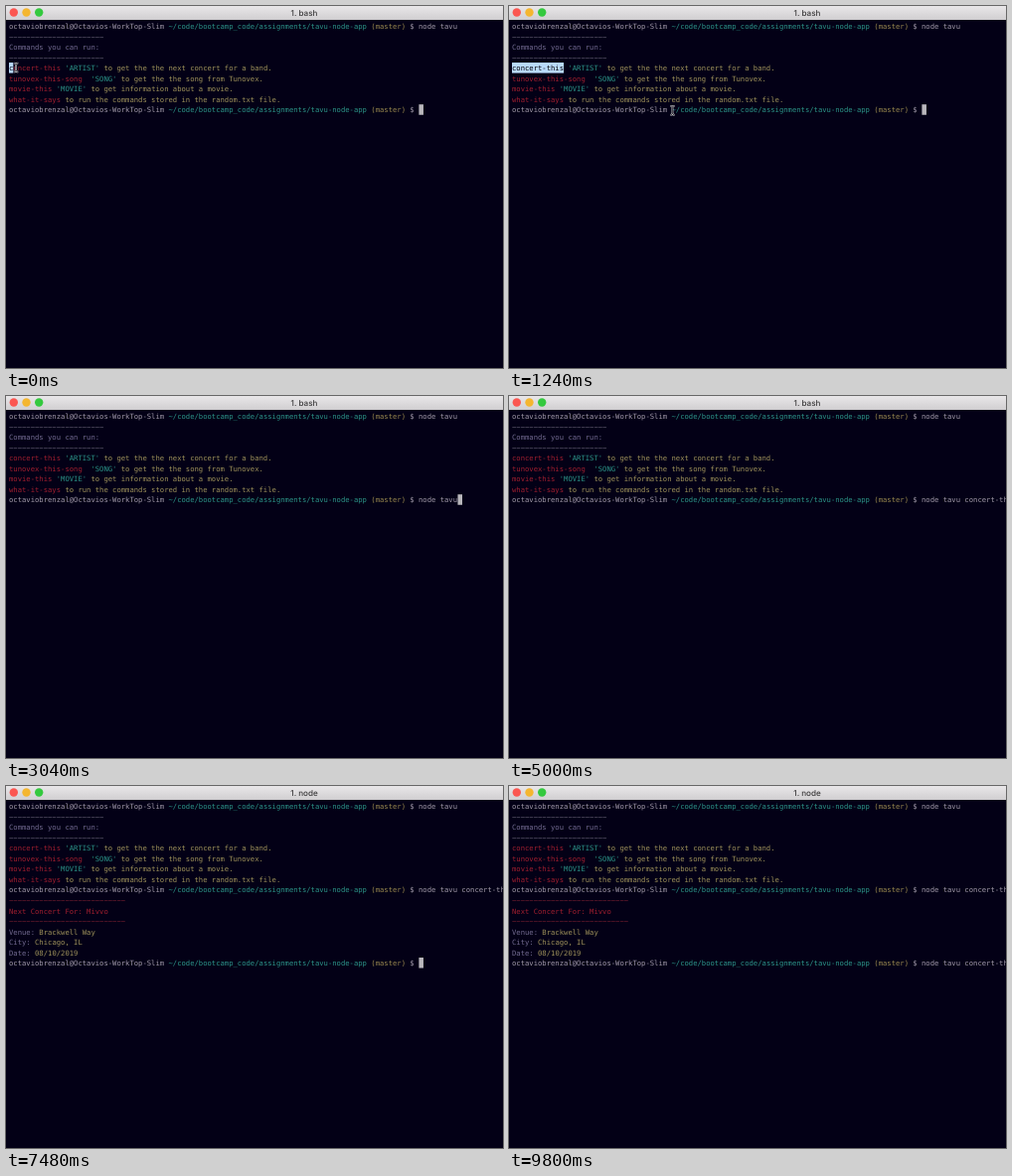
An HTML page that plays this animation: 500 by 365 pixels, repeating every 10000 ms.

```html
<!DOCTYPE html>
<html lang="en">
<head>
<meta charset="utf-8">
<title>Terminal</title>
<style>
  html, body { margin: 0; width: 100%; height: 100%; overflow: hidden; background: #030016; }
  svg { display: block; width: 100vw; height: 100vh; }
  text { white-space: pre; text-rendering: geometricPrecision; }
  #rows text { font: 7.21px "DejaVu Sans Mono", "Liberation Mono", monospace; }
  #title { font: 500 8.1px Inter, Roboto, sans-serif; fill: #3c3b3c; }
</style>
</head>
<body>
<svg viewBox="0 0 500 365" preserveAspectRatio="none">
  <defs>
    <linearGradient id="bar" x2="0" y2="1">
      <stop offset="0" stop-color="#e9e7e9"/>
      <stop offset="1" stop-color="#d0ced0"/>
    </linearGradient>
    <path id="beam" d="M-2.2-4.5Q0-4.5 0-3Q0-4.5 2.2-4.5M0-3V3M-2.2 4.5Q0 4.5 0 3Q0 4.5 2.2 4.5"/>
  </defs>
  <rect width="500" height="365" fill="#030016"/>
  <rect width="500" height="14" fill="url(#bar)"/>
  <circle cx="7.8" cy="6.5" r="4.2" fill="#fb5650"/>
  <circle cx="20.5" cy="6.5" r="4.2" fill="#f4b62f"/>
  <circle cx="33.2" cy="6.5" r="4.2" fill="#34c93e"/>
  <text id="title" x="300" y="9.6" text-anchor="middle">1. bash</text>
  <rect id="selection" x="3" fill="#b9dafa"/>
  <g id="rows"></g>
  <rect id="block" fill="#b9b7bc"/>
  <g id="mouse" fill="none">
    <use href="#beam" stroke="#f4f4f4" stroke-width="1.7"/>
    <use href="#beam" stroke="#15121c" stroke-width=".8"/>
  </g>
</svg>
<script>
const LOOP = 10000, LEFT = 3, TOP = 14.9, CELL = 4.341, LINE = 10.54;
const SVG = "http://www.w3.org/2000/svg";
const $ = id => document.getElementById(id);

const C = {
  plain: "#a199a8", path: "#2c9488", branch: "#98874e", red: "#a01e2f",
  dim: "#696378", label: "#726a90", note: "#9e915a", rule: "#7c1f31", picked: "#05050c"
};

const prompt = command => [
  ["octaviobrenzal@Octavios-WorkTop-Slim ", C.plain],
  ["~/code/bootcamp_code/assignments/tavu-node-app ", C.path],
  ["(master) ", C.branch],
  ["$ " + command, C.plain]
];
const PROMPT_COLS = prompt("").reduce((n, [s]) => n + s.length, 0);
const help = (name, arg, note) => [[name, C.red], [arg, C.path], [note, C.note]];
const field = (name, value) => [[name + ": ", C.label], [value, C.note]];
// the minus sign is wider than this font's hyphen
const dashes = (n, color) => [["\u2212".repeat(n), color]];

const PICK = "concert-this";
const FULL = "node tavu " + PICK;

const rowTop = row => TOP + row * LINE;
const colX = col => LEFT + col * CELL;
const lines = Array.from({ length: 16 }, (_, row) => {
  const el = document.createElementNS(SVG, "text");
  el.setAttribute("x", LEFT);
  el.setAttribute("y", rowTop(row) + 8.2);
  $("rows").append(el);
  return el;
});

function setAttrs(el, attrs) {
  for (const k in attrs) el.setAttribute(k, attrs[k]);
}

function setLine(row, parts) {
  const key = JSON.stringify(parts);
  const el = lines[row];
  if (el.key === key) return;
  el.key = key;
  el.replaceChildren(...parts.map(([text, color]) => {
    const span = document.createElementNS(SVG, "tspan");
    span.textContent = text;
    span.setAttribute("fill", color);
    return span;
  }));
}

const mix = (a, b, p) => a + (b - a) * p;
const progress = (t, from, to) => Math.min(1, Math.max(0, (t - from) / (to - from)));
const smooth = p => p * p * (3 - 2 * p);

function mouseAt(t) {
  if (t < 480) {
    const p = progress(t, 0, 480);
    return [mix(10, 52, p), mix(62, 59, p)];
  }
  if (t < 1040) return [mix(52, 57, progress(t, 480, 600)), 59];
  // dips below the prompt on its way to the right
  const p = smooth(progress(t, 1040, 1640));
  return [mix(57, 468, p), mix(59, 72, p) + 222 * p * (1 - p)];
}

function commandAt(t) {
  if (t < 2680) return "";
  if (t < 3480) return "node tavu";
  return t < 3840 ? "node tavu " : FULL;
}

function blockAt(t) {
  if (t < 6360) return [8, PROMPT_COLS + commandAt(t).length];
  if (t < 7440) return [9, 0];
  return [15, PROMPT_COLS + (t < 8280 ? 0 : FULL.length)];
}

function draw(t) {
  const picking = t < 2680;
  const [mx, my] = mouseAt(t);
  const picked = picking ? Math.min(PICK.length, Math.floor((mx - LEFT) / CELL)) : 0;
  const done = t >= 7440;

  setLine(0, prompt("node tavu"));
  setLine(1, dashes(22, C.dim));
  setLine(2, [["Commands you can run:", C.label]]);
  setLine(3, dashes(22, C.dim));
  setLine(4, [[PICK.slice(0, picked), C.picked],
    ...help(PICK.slice(picked), " 'ARTIST'", " to get the the next concert for a band.")]);
  setLine(5, help("tunovex-this-song", "  'SONG'", " to get the the song from Tunovex."));
  setLine(6, help("movie-this", " 'MOVIE'", " to get information about a movie."));
  setLine(7, help("what-it-says", "", " to run the commands stored in the random.txt file."));
  setLine(8, prompt(commandAt(t)));

  const output = [
    dashes(27, C.rule),
    [["Next Concert For: Mivvo", C.red]],
    dashes(27, C.rule),
    field("Venue", "Brackwell Way"),
    field("City", "Chicago, IL"),
    field("Date", "08/10/2019"),
    prompt(t < 8280 ? "" : FULL)
  ];
  output.forEach((parts, i) => setLine(9 + i, done ? parts : []));

  const [row, col] = blockAt(t);
  setAttrs($("block"), { x: colX(col), y: rowTop(row), width: CELL + .2, height: LINE });
  setAttrs($("selection"), { y: rowTop(4), width: picked * CELL, height: LINE });
  setAttrs($("mouse"), {
    transform: `translate(${mx} ${my})`,
    visibility: picking ? "visible" : "hidden"
  });
  const title = done ? "1. node" : "1. bash";
  if ($("title").textContent !== title) $("title").textContent = title;
}

function tick() {
  draw(performance.now() % LOOP);
  requestAnimationFrame(tick);
}
tick();
</script>
</body>
</html>
```
